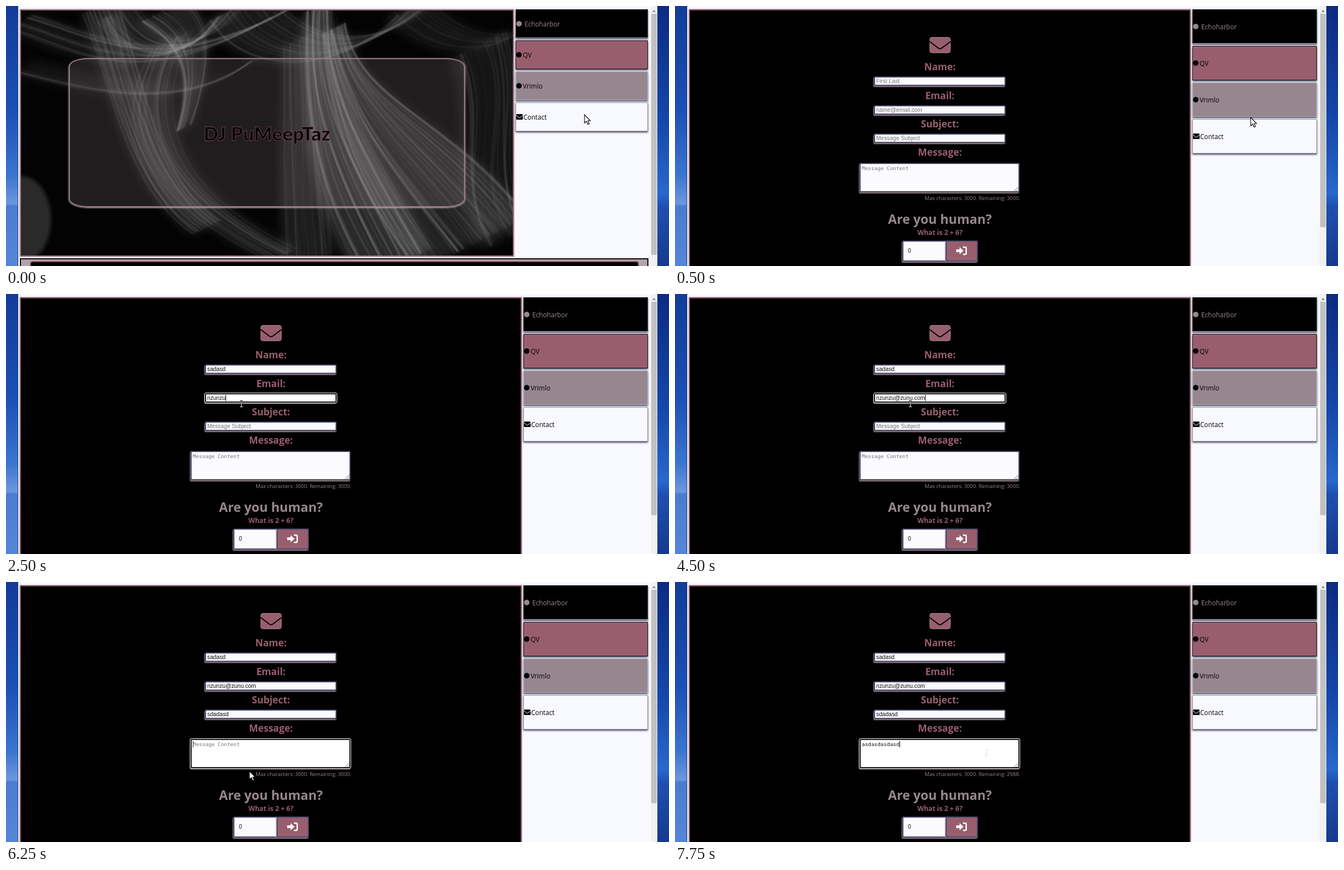
Write an HTML page with a canvas that moves like this. It is 1193x469 px and loops after 8000 ms.

```html
<!DOCTYPE html>
<html lang="en">
<head>
<meta charset="utf-8">
<style>
  :root { --rose: #995e6e; --mauve: #98868f; --ghost: #f8f8ff; --ink: #4a4868; }
  html, body { margin: 0; width: 100%; height: 100%; overflow: hidden; }
  body { position: relative; background: var(--ghost); font: 11.7px "Open Sans", "Noto Sans", sans-serif; }
  body *, body *::before { box-sizing: border-box; }
  .abs, .wall, .link, .field, .text { position: absolute; }
  .wall { top: 0; height: 469px; }
  #wallLeft { left: 0; width: 22px; border-right: 1px solid #223c78;
    background: linear-gradient(#123c98, #1b4fb6 40%, #3b74d0 65%, #6b97de 76%, #4a7cd0 77%, #5586d6); }
  #wallRight { left: 1172px; width: 21px;
    background: linear-gradient(#0c2b80, #1548aa 45%, #2868cc 72%, #1f50b0 77%, #16398c); }
  #track { left: 1160px; top: 0; width: 12px; height: 469px; background: #f1f1f1; }
  #thumb { left: 1161px; top: 14px; width: 10px; background: #c1c1c1; }
  #arrowUp { left: 1163px; top: 7px; border: 3px solid transparent; border-top: 0; border-bottom: 4px solid #8a8a8a; }
  .panel { left: 25px; top: 6px; border: 2px solid #a06e7c; background: #000; box-shadow: 0 0 2px #776; }
  #home .panel { width: 889px; height: 446px; }
  #form .panel { width: 903px; height: 480px; border-color: #84525f; }
  #hero { left: 113px; top: 94px; width: 713px; height: 269px; border: 2px solid #9d7480;
    border-radius: 34px / 15px; background: rgba(152,134,143,.2); box-shadow: 0 1px 3px #cbc4c8; }
  #title { left: 113px; top: 205px; width: 713px; text-align: center; font: 800 35px/48px Lato, sans-serif;
    color: #050304; -webkit-text-stroke: .8px #7f4a59; }
  #footer { left: 25px; top: 455px; width: 1131px; height: 30px; border: 2px solid #0a0808; background: #b3a2aa; }
  #footer div { left: 16px; top: 3px; width: 1096px; height: 30px; border: 2px solid #8d5866; border-radius: 5px; background: #000; }
  .link { display: flex; align-items: center; right: 38px; border: 1px solid; box-shadow: 0 2px 3px #445; }
  .link i { height: 10px; width: 10px; margin-right: 2px; border-radius: 50%; background: currentColor; }
  .link svg { margin-right: 1px; }
  .text { transform: translate(-50%, -50%); white-space: nowrap; line-height: 1.36; color: var(--rose); font-weight: 700; }
  .field { border: 2px solid var(--ink); border-radius: 2px; background: #fbfaff; padding-left: 2px;
    box-shadow: -1px 2px 2px var(--mauve); font: 10.26px/13px "Liberation Sans", Arial, sans-serif; color: #111; white-space: pre; }
  .field.focus { border-color: #0b0b0b; outline: 1px solid #fff; background: #fff; }
  .field u { display: inline-block; width: 1px; height: 11px; margin-right: -1px; background: #000; vertical-align: -2px; }
  .field s { text-decoration: none; color: #777; }
  #message { font: 9.37px/13px "DejaVu Sans Mono", monospace; padding-top: 1px; }
  #count { left: auto; right: 572px; transform: translateY(-50%); font-weight: 400; font-size: 9.3px; color: var(--mauve); }
  #beam { width: 7px; height: 12px; mix-blend-mode: difference; }
</style>
</head>
<body>
<div class="wall" id="wallLeft"></div>
<div class="wall" id="wallRight"></div>
<div class="abs" id="track"></div>
<div class="abs" id="thumb"></div>
<div class="abs" id="arrowUp"></div>

<div id="home">
  <div class="abs panel"><canvas id="smoke" width="885" height="442"></canvas></div>
  <div class="abs" id="hero"></div>
  <div class="abs" id="title">DJ PuMeepTaz</div>
  <div class="abs" id="footer"><div class="abs"></div></div>
</div>

<div id="form">
  <div class="abs panel"></div>
  <svg class="abs" style="left:457px;top:55px" width="40" height="31">
    <rect x="1.5" y="1.5" width="37" height="28" rx="4" fill="#995e6e" stroke="#98868f"/>
    <path d="M1 9L17 21Q20 23 23 21L39 9" fill="none" stroke="#000" stroke-width="2"/>
  </svg>
  <div class="field" id="message" style="left:332px;top:283px;width:288px;height:53px"></div>
  <svg class="abs" style="left:610px;top:326px" width="8" height="8"><path d="M0 8L8 0M4 8L8 4" stroke="#777"/></svg>
  <div class="text" id="count" style="top:347px"></div>
  <div class="field" style="left:409px;top:423px;width:80px;height:38px;padding-left:8px;line-height:34px">0</div>
  <div class="field" style="left:487px;top:423px;width:58px;height:38px;background:var(--rose)"></div>
  <svg class="abs" style="left:506px;top:433px" width="20" height="17" fill="#fff">
    <path d="M0 6H6V2L13 8.5L6 15V11H0Z"/>
    <path d="M12 2H16Q18 2 18 4V13Q18 15 16 15H12" fill="none" stroke="#fff" stroke-width="2.4"/>
  </svg>
</div>

<div id="links"></div>
<svg class="abs" id="arrow" width="14" height="21" viewBox="-1 -1 14 21">
  <path d="M0 0V15L3.5 12L6 17.5L8.5 16.5L6 11H10.5Z" fill="#fff" stroke="#000" stroke-width="1.1"/>
</svg>
<svg class="abs" id="beam" viewBox="0 0 7 12"><path d="M1 .5H6M3.5 0V12M1 11.5H6" fill="none" stroke="currentColor"/></svg>

<script>
const $ = id => document.getElementById(id);
const form = $('form');

function addTo(parent, className, css, html = '') {
  const el = document.createElement('div');
  el.className = className;
  el.style.cssText = css;
  el.innerHTML = html;
  return parent.appendChild(el);
}

// Form labels and single-line fields
const label = (y, text, size, color = 'var(--rose)') =>
  addTo(form, 'text', `left:476.7px;top:${y}px;font-size:${size}px;color:${color}`, text);
label(110, 'Name:', 17.3);
label(162, 'Email:', 17.3);
label(213, 'Subject:', 17.3);
label(264, 'Message:', 17.3);
label(384.5, 'Are you human?', 23, 'var(--mauve)');
label(408.5, 'What is 2 + 6?', 12.1);
const input = y => addTo(form, 'field', `left:358px;top:${y}px;width:237px;height:17px`);

const fields = [
  { el: input(127), hint: 'First Last', text: 'sadasd', from: 5, typed: s => (s - 5) * 3 },
  { el: input(179), hint: 'name@email.com', text: 'nzunzu@zunu.com', from: 8,
    typed: s => s < 12 ? Math.min(6, (s - 8) * 3) : s < 17 ? s - 5 : 11 + (s - 16) * 2 },
  { el: input(230), hint: 'Message Subject', text: 'sdadasd', from: 19, typed: s => (s - 19) * 3 },
  { el: $('message'), hint: 'Message Content', text: 'asdasdasdasd', from: 24, typed: s => (s - 27) * 3 }
];

// Side links
const envelope = `<svg width="12" height="10"><rect width="12" height="10" rx="1.5"/>
  <path d="M0 2.5L6 7L12 2.5" fill="none" stroke="#f8f8ff"/></svg>`;
const links = [
  ['<i style="margin-right:5px"></i>Echoharbor', '#000', 'var(--mauve)', '#111 #222 #a9bcd8'],
  ['<i></i>QV', 'var(--rose)', '#000', '#1d1420'],
  ['<i></i>Vrimlo', 'var(--mauve)', '#000', '#a7b6d4'],
  [envelope + 'Contact', 'var(--ghost)', '#000', '#a89ea6']
].map(([html, fill, color, border]) =>
  addTo($('links'), 'link', `background:${fill};color:${color};border-color:${border}`, html));

// Smoke ribbons: x0,y0, two control points, x1,y1, spread at start, spread at end, strands, alpha
function drawSmoke() {
  const c = $('smoke').getContext('2d');
  let seed = 11;
  const random = () => (seed = (seed * 16807) % 2147483647) / 2147483647;
  c.fillStyle = '#030303';
  c.fillRect(0, 0, 885, 442);
  c.translate(-27, -8);
  c.filter = 'blur(3px)';
  c.fillStyle = '#2a2a2a';
  c.beginPath();
  c.ellipse(28, 385, 53, 78, 0, 0, 7);
  c.fill();
  c.strokeStyle = c.fillStyle = '#b0b0b0';
  const ribbons = [
    [560, 0, 555, 160, 590, 280, 700, 470, 50, 130, 50, .45],
    [590, 40, 610, 180, 700, 250, 840, 430, 40, 200, 70, .36],
    [525, 60, 530, 180, 530, 300, 545, 470, 60, 90, 20, .28],
    [165, 0, 215, 130, 240, 320, 360, 400, 60, 50, 28, .32],
    [300, 60, 220, 200, 270, 340, 500, 450, 80, 50, 26, .28],
    [20, 30, 130, 60, 250, 150, 480, 20, 60, 80, 26, .2],
    [30, 110, 150, 140, 330, 190, 460, 90, 50, 60, 16, .18],
    [200, 10, 230, 80, 330, 110, 400, 10, 70, 60, 28, .32],
    [420, 0, 470, 100, 640, 110, 740, 0, 120, 80, 30, .26],
    [280, 10, 330, 40, 360, 100, 320, 220, 90, 30, 26, .34],
    [850, 70, 900, 200, 830, 300, 900, 420, 110, 90, 26, .22],
    [720, 0, 780, 70, 860, 80, 920, 50, 80, 60, 16, .2]
  ];
  for (const [x0, y0, ax, ay, bx, by, x1, y1, start, end, count, alpha] of ribbons) {
    const edge = (u, wobble = 0) => {
      const p = u * start, q = u * end;
      return [[x0 + p, y0 - p / 2], [ax + p + wobble, ay - p / 2], [bx + q - wobble, by - q / 2], [x1 + q, y1 - q / 2]];
    };
    // Soft body between the two outer edges
    const left = edge(-.5), right = edge(.5).reverse();
    c.filter = 'blur(9px)';
    c.globalAlpha = alpha * .5;
    c.beginPath();
    c.moveTo(...left[0]);
    c.bezierCurveTo(...left.slice(1).flat());
    c.lineTo(...right[0]);
    c.bezierCurveTo(...right.slice(1).flat());
    c.fill();
    c.filter = 'blur(0.8px)';
    for (let i = 0; i < count; i++) {
      const [from, ...curve] = edge(random() - .5, (random() - .5) * 30);
      c.lineWidth = .6 + 3.4 * random() ** 2;
      c.globalAlpha = alpha * .8 * random();
      c.beginPath();
      c.moveTo(...from);
      c.bezierCurveTo(...curve.flat());
      c.stroke();
    }
  }
}
drawSmoke();

// Pointer stops: step, kind, x, y, beam colour
const pointer = [
  [0, 'arrow', 1040, 196], [1, 'arrow', 1035, 201], [3, 'arrow', 800, 185], [4, 'arrow', 560, 158],
  [5, 'beam', 425, 137, '#fff'], [8, 'beam', 423, 198, '#fff'], [23, 'beam', 428, 244, '#fff'],
  [24, 'beam', 434, 310, '#fff'], [25, 'arrow', 437, 341], [26, 'beam', 520, 318, '#222'], [27, 'beam', 560, 308, '#222']
];

function showPointer(step) {
  const [, kind, x, y, color] = pointer.findLast(p => p[0] <= step);
  for (const id of ['arrow', 'beam']) $(id).style.display = id === kind ? 'block' : 'none';
  const offset = kind === 'arrow' ? [0, 1] : [3.5, 6];
  Object.assign($(kind).style, { left: x - offset[0] + 'px', top: y - offset[1] + 'px', color });
}

function render(step) {
  const home = step < 2;
  $('home').style.display = home ? '' : 'none';
  form.style.display = home ? 'none' : '';
  $('thumb').style.height = (home ? 435 : 385) + 'px';

  links.forEach((link, i) => Object.assign(link.style, {
    left: (home ? 917 : 931) + 'px',
    top: 6 + i * (home ? 56 : 66) + 'px',
    height: (home ? 52 : 62) + 'px',
    boxShadow: step === 1 && i === 3 ? 'none' : ''
  }));

  const active = fields.findLast(f => f.from <= step);
  for (const f of fields) {
    const value = f.text.slice(0, Math.max(0, f.typed(step)));
    const caret = f === active ? '<u></u>' : '';
    f.el.classList.toggle('focus', f === active);
    f.el.innerHTML = value + caret + (value ? '' : `<s>${f.hint}</s>`);
    if (f.el.id === 'message') $('count').textContent = `Max characters: 3000. Remaining: ${3000 - value.length}.`;
  }
  showPointer(step);
}

let shown = -1;
function tick() {
  const step = Math.floor(performance.now() % 8000 / 250);
  if (step !== shown) render(shown = step);
  requestAnimationFrame(tick);
}
tick();
</script>
</body>
</html>
```
